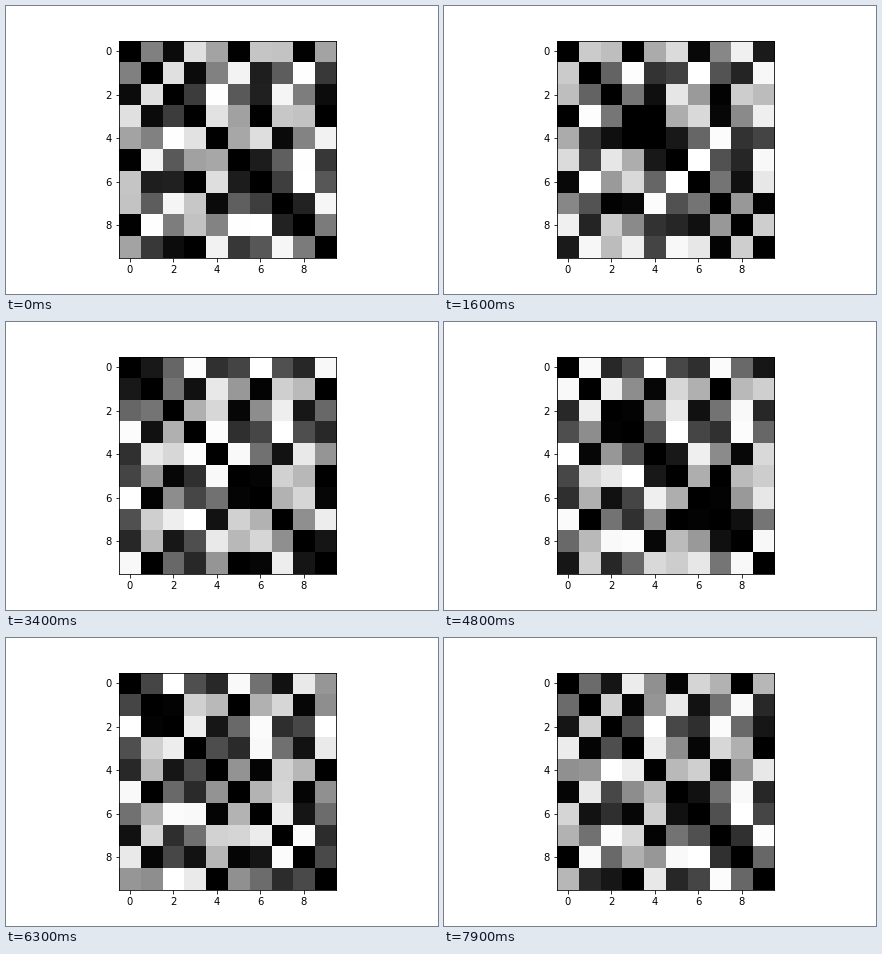
A matplotlib script that plays this animation: 432x288 px, repeating every 8000 ms.

```python
import numpy as np
import matplotlib.pyplot as plt
from matplotlib.animation import FuncAnimation

SIZE = 10        # matrix rows and columns
FRAMES = 80
INTERVAL = 100   # ms
PERIOD = 40      # frames per oscillation
LAG = 2.0        # radians between neighbouring pairs

plt.rcParams.update({
    "font.family": "DejaVu Sans",
    "font.size": 10,
    "figure.subplot.left": 0.125,
    "figure.subplot.right": 0.9,
    "figure.subplot.bottom": 0.125,
    "figure.subplot.top": 0.88,
})

rows, cols = np.triu_indices(SIZE, 1)
lags = LAG * np.arange(len(rows))


def matrix(n):
    """Symmetric matrix of lagged sine waves with a zero diagonal."""
    wave = 0.5 + 0.5 * np.sin(2 * np.pi * n / PERIOD - lags)
    m = np.zeros((SIZE, SIZE))
    m[rows, cols] = wave
    m[cols, rows] = wave
    return m


fig, ax = plt.subplots(figsize=(6, 4), dpi=72, facecolor="white")
image = ax.imshow(matrix(0), cmap="gray", vmin=0, vmax=1,
                  interpolation="nearest")


def update(n):
    image.set_data(matrix(n))
    return [image]


anim = FuncAnimation(fig, update, frames=FRAMES, interval=INTERVAL,
                     repeat=True, repeat_delay=0, blit=False)
plt.show()
```
